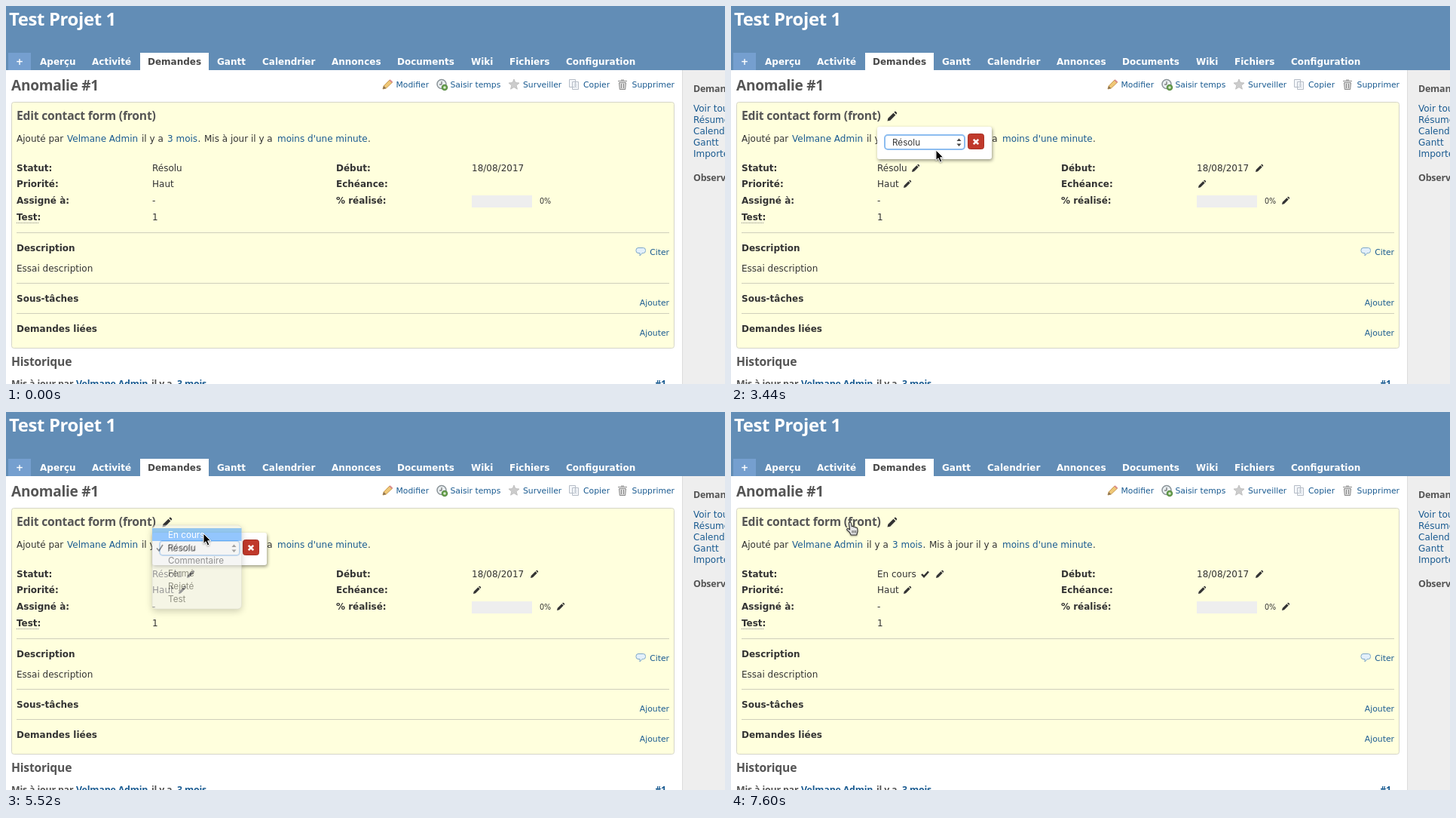
These frames come from a looping animation (954x501 px, 8000 ms). An HTML page:

```html
<!DOCTYPE html>
<html lang="fr">
<head>
<meta charset="utf-8">
<title>Test Projet 1</title>
<style>
  html, body { margin: 0; width: 100%; height: 100%; overflow: hidden; background: #fff; }
  svg { display: block; }
  text { font: 12px "DejaVu Sans", sans-serif; fill: #333; white-space: pre; }
  .b { font-weight: 700; }
  .tab { font-weight: 700; fill: #fff; }
  .on { fill: #484848; }
  .a { fill: #1a5b91; }
  .s { font-size: 10.8px; fill: #1a5b91; }
  .pct { font-size: 9.6px; }
  .end { text-anchor: end; }
  .h { font-family: "Open Sans", sans-serif; font-weight: 700; letter-spacing: -.015em; fill: #555; }
  .h1 { font-size: 23.9px; fill: #fff; }
  .h2 { font-size: 19.1px; }
  .h3 { font-size: 15.7px; }
  .h4 { font-size: 12.4px; }
  .hl { fill: #1a5b91; }
  .m { font: 11.7px Inter, sans-serif; fill: #3a3a3a; }
  .m.lit { fill: #fff; }
  .rule { stroke: #cfcfbb; }
  #popup { filter: drop-shadow(1px 2px 2px rgba(0, 0, 0, .4)); }
  #menu { filter: drop-shadow(0 3px 5px rgba(0, 0, 0, .35)); }
  #arrow, #hand { filter: drop-shadow(0 1px 1px rgba(0, 0, 0, .35)); }
</style>
</head>
<body>
<svg id="stage" width="954" height="501" viewBox="0 0 954 501">
  <defs>
    <path id="pen" d="M0 10 .7 7 6.4 1.3 8.7 3.6 3 9.3ZM7.1.6 8 -.2Q8.5 -.5 9 0L10 1Q10.4 1.5 10 2L9.4 2.9Z" fill="#333"/>
    <path id="tick" d="M1 5.5 4 8.6 10 2" fill="none" stroke="#333" stroke-width="2.5"/>
  </defs>

  <rect width="954" height="85" fill="#628db6"/>
  <rect x="3" y="62" width="30" height="23" fill="#759fcf"/>
  <rect x="178" y="62" width="91" height="23" fill="#fff"/>
  <rect x="897" y="85" width="57" height="416" fill="#eee"/>
  <path d="M897.5 85V501" stroke="#ddd"/>
  <rect x="7.5" y="127.5" width="879" height="326" rx="3" fill="#ffffdd" stroke="#d5d5c8"/>
  <path class="rule" d="M14 300.5H880M14 367.5H880M14 407.5H880"/>
  <path d="M14 287.5H43" stroke="#888" stroke-dasharray="1 1"/>
  <rect x="618" y="251" width="80" height="16" fill="#eee"/>

  <g id="icons" stroke-linejoin="round">
    <path d="M500 110 501.2 106 509 98 512.5 101.3 504.3 109Z" fill="#f0c877" stroke="#c99b52"/>
    <path d="M500 110 501.2 106 504.3 109Z" fill="#8a7355"/>
    <path d="M509 98 512.5 101.3" stroke="#d98c8c" stroke-width="2"/>
    <circle cx="578" cy="103.500" r="6" fill="#e9eef0" stroke="#8b9499" stroke-width="1.500"/>
    <path d="M578 100V104H575" fill="none" stroke="#555"/>
    <circle cx="582" cy="108" r="3.700" fill="#6fa653" stroke="#4d8139"/>
    <path d="M580.300 108H583.700M582 106.300V109.700" stroke="#fff"/>
    <path d="M674 97 676 101.600 681 102 677.200 105.300 678.400 110.200 674 107.600 669.600 110.200 670.800 105.300 667 102 672 101.600Z" fill="#ccc" stroke="#b8b8b8" stroke-width=".8"/>
    <path d="M747.500 97.500H755.500V107.500H747.500ZM751.500 100.500H759.500V110.500H751.500Z" fill="#f5f7fa" stroke="#b5bcc6"/>
    <path d="M753.500 103.500H757.500M753.500 105.500H757.500M753.500 107.500H757.500" stroke="#cbd2da"/>
    <path d="M813.500 101.500H822.500L821.700 110.500H814.300Z" fill="#ddd" stroke="#888"/>
    <path d="M812 99.500H824M816 98H820M816.500 103V109M819.500 103V109" stroke="#888"/>
    <path d="M839 320.500H845.500Q848.500 320.500 848.500 323.500V324.500Q848.500 327.500 845.500 327.500H844L841 331V327.500H839Q836 327.500 836 324.500V323.500Q836 320.500 839 320.500Z" fill="#e3f0fa" stroke="#7ea7c8"/>
  </g>

  <g id="page"></g>

  <g id="pens">
    <use href="#pen" transform="translate(207.500 140) scale(1.250)"/>
    <use href="#pen" x="229" y="231"/>
    <use href="#pen" x="696" y="210"/>
    <use href="#pen" x="620" y="231"/>
    <use href="#pen" x="731" y="253"/>
    <use href="#pen" id="statusPen" y="210"/>
    <use href="#tick" id="saved" x="252" y="209.500"/>
  </g>

  <g id="popup">
    <rect x="194" y="160" width="152" height="43" rx="3" fill="#fff"/>
    <rect x="204" y="171" width="106" height="19" rx="4" fill="#fff" stroke="#8dbdf0" stroke-width="2"/>
    <text class="m" id="choice" x="214" y="185"></text>
    <path d="M299.500 179 302.500 175.500 305.500 179ZM299.500 182.500 302.500 186 305.500 182.500Z" fill="#444"/>
    <rect x="314.500" y="169.500" width="21" height="20" rx="3" fill="#c0392b" stroke="#a93226"/>
    <path d="M321.800 176.800 328.200 183.200M328.200 176.800 321.800 183.200" stroke="#fff" stroke-width="2.600"/>
  </g>

  <g id="menu">
    <rect x="194" y="150" width="118.500" height="111" rx="5" fill="#ededec" stroke="#c4c4c4" stroke-width=".6"/>
    <rect id="lit" x="194" width="118.500" height="17" fill="#3b99fc"/>
    <g id="options"></g>
    <path id="check" d="M200 180.500 203 184 208 176" fill="none" stroke-width="1.600"/>
  </g>

  <g id="pointer">
    <circle id="click" r="16.500" fill="#fff" fill-opacity=".55" stroke="#222" stroke-width="1.400"/>
    <path id="arrow" d="M0 0V13.500L3.100 10.700 5.400 16 7.900 14.900 5.600 9.800H9.800Z" fill="#000" stroke="#fff" stroke-width="1"/>
    <g id="hand">
      <path d="M-3.500 -6.500Q-3.700 -8 -2.300 -8T-.6 -6.500L.3 -2.200Q2.200 -3.300 3 -1.600 4.700 -2.500 5.400 -.8 7.500 -1.400 7.800 1L8 4 6.700 9H-.8L-2.500 5.700 -6.200 2.200Q-6.600 .5 -4.800 .6L-2.300 2Z" fill="#e4e4e4" stroke="#333" stroke-width="1.100" stroke-linejoin="round"/>
      <path d="M1 3V6.500M3.200 3V6.500M5.400 3V6.500" stroke="#444" stroke-width=".9"/>
    </g>
  </g>
</svg>
<script>
const $ = id => document.getElementById(id);
const label = ([x, y, cls, str]) => `<text x="${x}" y="${y}" class="${cls}">${str}</text>`;
const author = 'Velmane Admin';
const options = ['En cours', 'Résolu', 'Commentaire', 'Fermé', 'Rejeté', 'Test'];

$('page').innerHTML = [
  [4, 26, 'h h1', 'Test Projet 1'],
  [13, 78, 'tab', '+'], [45, 78, 'tab', 'Aperçu'], [114, 78, 'tab', 'Activité'],
  [188, 78, 'tab on', 'Demandes'], [280, 78, 'tab', 'Gantt'], [340, 78, 'tab', 'Calendrier'],
  [432, 78, 'tab', 'Annonces'], [519, 78, 'tab', 'Documents'], [617, 78, 'tab', 'Wiki'],
  [668, 78, 'tab', 'Fichiers'], [743, 78, 'tab', 'Configuration'],
  [7, 112, 'h h2', 'Anomalie #1'],
  [517.5, 108, 's', 'Modifier'], [589.5, 108, 's', 'Saisir temps'], [686, 108, 's', 'Surveiller'],
  [766, 108, 's', 'Copier'], [887, 108, 's end', 'Supprimer'],
  [14, 151, 'h h3', 'Edit contact form (front)'],
  [14, 180, '', 'Ajouté par'], [81, 180, 'a', author], [180, 180, '', 'il y a'],
  [214, 180, 'a', '3 mois'], [254.5, 180, '', '.'], [263, 180, '', 'Mis à jour il y a'],
  [360, 180, 'a', "moins d'une minute"], [480, 180, '', '.'],
  [14, 219, 'b', 'Statut:'], [438, 219, 'b', 'Début:'], [618, 219, '', '18/08/2017'],
  [14, 240, 'b', 'Priorité:'], [194, 240, '', 'Haut'], [438, 240, 'b', 'Echéance:'],
  [14, 262, 'b', 'Assigné à:'], [194, 262, '', '-'], [438, 262, 'b', '% réalisé:'],
  [708, 262, 'pct', '0%'], [14, 284, 'b', 'Test:'], [194, 284, '', '1'],
  [14, 325, 'b', 'Description'], [880, 330, 's end', 'Citer'], [14, 352, '', 'Essai description'],
  [14, 392, 'b', 'Sous-tâches'], [880, 397, 's end', 'Ajouter'],
  [14, 432, 'b', 'Demandes liées'], [880, 437, 's end', 'Ajouter'],
  [7, 477, 'h h3', 'Historique'],
  [7, 505, 'h h4', 'Mis à jour par'], [93, 505, 'h h4 hl', author], [193, 505, 'h h4', 'il y a'],
  [227, 505, 'h h4 hl', '3 mois'], [876, 505, 'h h4 hl end', '#1'],
  [912, 114, 'h h4', 'Demandes'], [912, 140, 'a', 'Voir toutes'], [912, 155, 'a', 'Résumé'],
  [912, 170, 'a', 'Calendrier'], [912, 185, 'a', 'Gantt'], [912, 200, 'a', 'Importer'],
  [912, 232, 'h h4', 'Observateurs']
].map(label).join('') + '<text id="status" x="194" y="219"></text>';

$('options').innerHTML = options.map((name, i) => label([215, 167 + 17 * i, 'm', name])).join('');

// Pointer path: time, x, y
const path = [
  [160, 324, 473], [240, 362, 400], [320, 440, 280], [400, 525, 160], [480, 567, 106],
  [640, 567, 106], [720, 540, 128], [800, 470, 190], [880, 385, 248], [960, 310, 273],
  [1040, 262, 252], [1120, 240, 214], [1280, 226, 217], [1440, 222.5, 220],
  [3040, 222.5, 220], [3200, 236, 212], [3440, 272, 191], [3680, 284, 186],
  [4320, 284, 186], [4400, 284, 186], [4640, 272, 172], [4880, 262, 161],
  [6000, 262, 161], [6240, 270, 190], [6560, 281, 231], [6800, 281, 233],
  [7120, 281, 233], [7280, 245, 207], [7440, 185, 168], [7600, 160, 154], [8000, 160, 154]
];
const clicks = [[1760, 1920], [2480, 2640], [3920, 4080], [5280, 5440]];
const FRAME = 80, LOOP = 8000, OPEN = 2560, MENU = 4000, SAVED = 6080;

const within = (t, a, b) => t >= a && t < b;
const show = (id, on) => $(id).style.display = on ? '' : 'none';

function pointerAt(t) {
  const i = Math.max(1, path.findIndex(p => p[0] > t));
  const [t0, x0, y0] = path[i - 1], [t1, x1, y1] = path[i];
  const k = Math.max(0, (t - t0) / (t1 - t0));
  return [x0 + (x1 - x0) * k, y0 + (y1 - y0) * k];
}

function draw(t) {
  const [x, y] = pointerAt(t);
  const hand = within(t, 1200, 3200) || t >= 7440;
  $('pointer').setAttribute('transform', `translate(${x} ${y})`);
  show('pointer', t >= 160);
  show('arrow', !hand);
  show('hand', hand);
  show('click', clicks.some(([a, b]) => within(t, a, b)));

  const saved = t >= SAVED;
  $('status').textContent = options[saved ? 0 : 1];
  show('pens', t >= OPEN);
  show('saved', saved);
  $('statusPen').setAttribute('x', saved ? 272 : 240);
  show('popup', within(t, OPEN, SAVED));
  $('choice').textContent = options[t < 5600 ? 1 : 0];

  const row = within(t, 5360, 5440) ? -1 : Math.floor((y - 154) / 17);
  show('menu', within(t, MENU, 5680));
  $('menu').style.opacity = t < 5520 ? 1 : t < 5600 ? .55 : .2;
  show('lit', row >= 0);
  $('lit').setAttribute('y', 154 + 17 * row);
  [...$('options').children].forEach((el, i) => el.classList.toggle('lit', i === row));
  $('check').setAttribute('stroke', row === 1 ? '#fff' : '#333');
}

const start = performance.now();
function tick() {
  const t = (performance.now() - start) % LOOP;
  draw(Math.floor(t / FRAME) * FRAME);
  requestAnimationFrame(tick);
}
tick();
</script>
</body>
</html>
```
